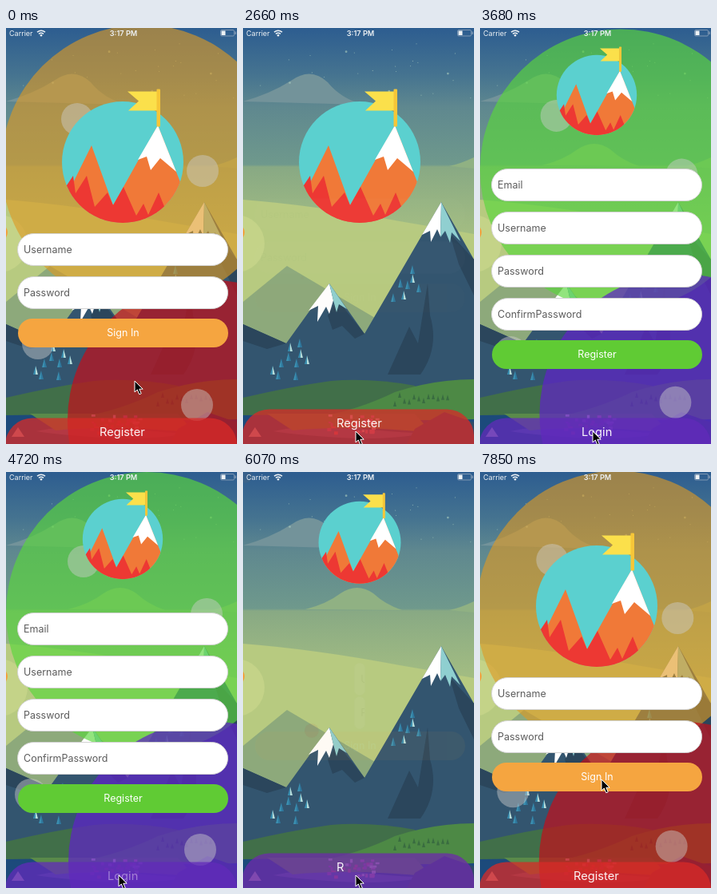
An HTML page for the animation above (8000 ms loop, 289 by 521 pixels).

```html
<!DOCTYPE html>
<html lang="en">
<head>
<meta charset="utf-8">
<title>Sign in and register</title>
<style>
  html, body { margin: 0; width: 100%; height: 100%; overflow: hidden; background: #2d5d90; }
  body { position: relative; font-family: Inter, Roboto, sans-serif; }
  svg { position: absolute; left: 0; top: 0; }
  .field, .button { position: absolute; box-sizing: border-box; white-space: nowrap; overflow: hidden; font-size: 12.5px; }
  .field {
    height: 41px; padding: 0 5px 0 7px; line-height: 39px; border: 1px solid #d2d2d2; border-radius: 21px;
    background: #fff; color: #5c5c5c; text-overflow: ellipsis;
  }
  .button { left: 15px; width: 263px; height: 36px; line-height: 36px; border-radius: 18px; color: #fff; text-align: center; }
</style>
</head>
<body>
<svg width="289" height="521" viewBox="0 0 289 521">
  <defs>
    <linearGradient id="sky" gradientUnits="userSpaceOnUse" x1="0" y1="0" x2="0" y2="300">
      <stop offset="0" stop-color="#2d5d90"/>
      <stop offset=".2" stop-color="#467490"/>
      <stop offset=".33" stop-color="#5f888f"/>
      <stop offset=".57" stop-color="#6f998c"/>
      <stop offset=".58" stop-color="#88a984"/>
      <stop offset=".7" stop-color="#94b283"/>
      <stop offset=".85" stop-color="#a2bc82"/>
    </linearGradient>
    <clipPath id="disc"><circle cx="146" cy="168" r="76"/></clipPath>
  </defs>

  <rect width="289" height="521" fill="url(#sky)"/>
  <path d="M0 92Q35 82 60 66Q85 48 106 68Q122 88 150 96Z" fill="#73939a"/>
  <path d="M78 172Q105 165 122 152Q143 138 163 152Q178 166 199 173ZM258 173Q272 170 289 162V176Z" fill="#90b183"/>
  <path d="M0 215Q90 222 196 242L289 258V400H0Z" fill="#b7ca80"/>
  <circle cx="-9" cy="270" r="36" fill="#c4d388"/>
  <circle cx="-9" cy="256" r="11" fill="#f3a03c"/>
  <path d="M0 343L55 298L165 363V410H0Z" fill="#8da97b"/>
  <path d="M0 371L54 395L108 320L152 383L248 218L289 290V500H0Z" fill="#33556f"/>
  <path d="M0 371L54 395L30 402L0 392ZM118 340L152 383L140 389L124 373L112 378L106 360ZM258 256L289 290V335L270 296ZM231 320L219 395L208 374L181 434H222Q246 400 234 360Z" fill="#2b465c"/>
  <path d="M108 320L82 354L94 348L93 368L104 349L108 358L113 341Z" fill="#fff"/>
  <path d="M108 320L113 341L117 356L120 346L130 352Z" fill="#8fcfd0"/>
  <path d="M248 218L224 259L234 254L235 268L243 252L247 261Z" fill="#fff"/>
  <path d="M248 218L247 262L253 254L259 269L261 256L272 267Z" fill="#8fcfd0"/>
  <g id="trees"></g>
  <path d="M0 463Q60 449 110 442Q160 438 215 448L240 490H0Z" fill="#416f49"/>
  <path d="M92 488Q145 478 190 456Q240 440 289 440V521H92Z" fill="#4d8945"/>
  <path d="M0 485Q70 483 145 488T289 490V521H0Z" fill="#1c4a7b"/>
  <path d="M38 505Q90 494 145 501T232 507Q180 517 120 513T38 505Z" fill="#476497"/>
  <path d="M30 483H215L236 507Q140 497 62 504Z" fill="#5a8a4a"/>
  <path d="M215 502L252 481L289 494V521H205Z" fill="#304b67"/>
  <path d="M7 512L15 500L23 512Z" fill="#b5a5bd"/>
  <g id="town" opacity=".8"></g>

  <circle class="big"/><circle class="big"/>
  <g id="bubbles"></g>

  <rect id="bar" x="-1" width="290" height="80" rx="34"/>
  <text id="barText" font-size="14.7" fill="#fff"></text>

  <g id="logo">
    <circle cx="146" cy="168" r="76" fill="#5bd0cf"/>
    <g clip-path="url(#disc)">
      <path d="M66 230L107 147L134 222L190 122L222 203V250H66Z" fill="#f07938"/>
      <path d="M190 122L165 165L176 161L181 178L193 163L213 180Z" fill="#fff"/>
      <path d="M66 212L84 185L87 207L101 185L111 224L127 206L134 222L147 199L163 235L172 220L178 234L191 206L199 226L222 208V250H66Z" fill="#ed3833"/>
    </g>
    <path d="M152 79.5H189V103.5H153L166 91.5Z" fill="#fbe04b"/>
    <rect x="188.5" y="76.5" width="4.5" height="47" rx="1" fill="#f6c638"/>
  </g>

  <g fill="#eef2f5">
    <text x="4" y="9.5" font-size="9">Carrier</text>
    <text x="147" y="9.5" font-size="9.2" font-weight="600" text-anchor="middle">3:17 PM</text>
    <path d="M39 5.2Q44 1.2 49 5.2M41 7.4Q44 5 47 7.4" fill="none" stroke="#eef2f5" stroke-width="1.5"/>
    <circle cx="44" cy="9.2" r="1.3"/>
    <rect x="268.5" y="2.5" width="17" height="7.5" rx="1.5" fill="none" stroke="#7f98b3"/>
    <rect x="269.5" y="3.5" width="5" height="5.5"/>
    <rect x="286.5" y="4.5" width="1.5" height="3.5" fill="#7f98b3"/>
  </g>
</svg>
<svg width="289" height="521" viewBox="0 0 289 521" style="z-index:1">
  <path id="cursor" d="M0 0V14L3.3 11L5.8 16.8L8.2 15.8L5.8 10.2H10.2Z" fill="#000" stroke="#fff"/>
</svg>

<script>
const $ = id => document.getElementById(id);
const LOOP = 8000, ENTER_MS = 750;
const TO_REGISTER = { press: 1700, exit: 1900, enter: 2936 };
const TO_LOGIN = { press: 4690, exit: 4933, enter: 5969 };

const clamp = x => Math.max(0, Math.min(1, x));
const ramp = (t, start, ms) => clamp((t - start) / ms);
const ease = (t, start, ms) => { const x = ramp(t, start, ms); return x * x * (3 - 2 * x); };
const mix = (a, b, k) => a + (b - a) * k;
const mixAll = (a, b, k) => a.map((v, i) => mix(v, b[i], k));

function addShape(parent, tag, attrs) {
  const node = document.createElementNS("http://www.w3.org/2000/svg", tag);
  setAttrs(node, attrs);
  return parent.appendChild(node);
}
function setAttrs(node, attrs) {
  for (const name in attrs) node.setAttribute(name, attrs[name]);
}

// Small scenery
let seed = 7;
const random = () => (seed = seed * 16807 % 2147483647) / 2147483647;
const trees = [[37,434],[44,440],[48,425],[59,405],[57,417],[71,400],[72,413],[67,425],[66,441],[80,421],
  [188,343],[197,325],[201,340],[206,327],[212,308],[212,319],[220,331]];
trees.forEach(([x, y], i) => {
  addShape($("trees"), "path", { d: `M${x} ${y}v-11l-3 11z`, fill: "#3b8fb0" });
  addShape($("trees"), "path", { d: `M${x} ${y}v-11l3 11z`, fill: i % 3 ? "#2f789d" : "#b5dcda" });
});
for (let i = 0; i < 12; i++)
  addShape($("town"), "path", { d: `M${188 + i * 6} ${474 - random() * 12}l2 -7l2 7z`, fill: "#35653f" });
for (let i = 0; i < 36; i++)
  addShape($("town"), "rect", {
    x: 102 + random() * 64, y: 484 + random() * 22, width: 3 + random() * 3, height: 2 + random() * 3,
    fill: ["#ee586e", "#d877a4", "#b65c9b", "#f0c6d0"][i % 4]
  });
for (let i = 0; i < 24; i++)
  addShape($("trees"), "circle", { cx: random() * 289, cy: 18 + random() * 70, r: i % 6 ? .6 : 1.4, fill: "#a5c7bc", opacity: .65 });

// Screens
function makeForm(labels, buttonLabel, color) {
  const make = (kind, text) => {
    const node = document.createElement("div");
    node.className = kind;
    node.textContent = text;
    return document.body.appendChild(node);
  };
  const form = { fields: labels.map(text => make("field", text)), button: make("button", buttonLabel) };
  form.button.style.background = color;
  return form;
}
const login = {
  ...makeForm(["Username", "Password"], "Sign In", "#f5a540"),
  top: [259, 277], buttonY: [341, 382], barLabel: "Register", barX: 117,
  circles: ["rgba(223,154,34,.62)", "rgba(195,15,27,.7)"]
};
const register = {
  ...makeForm(["Email", "Username", "Password", "ConfirmPassword"], "Register", "#60cb34"),
  top: [250, 196], buttonY: [409, 409], barLabel: "Login", barX: 127,
  circles: ["rgba(90,215,60,.66)", "rgba(95,35,198,.72)"]
};
const bigCircles = [...document.querySelectorAll(".big")];

// Corner of each bubble at the start and end of its drift
const bubbles = [
  { login: [[69, 94], [71, 88]], register: [[75, 89], [77, 92]] },
  { login: [[226, 159], [228, 165]], register: [[233, 166], [231, 158]] },
  { login: [[20, 375], [22, 383]], register: [[22, 387], [11, 384]] },
  { login: [[219, 452], [220, 447]], register: [[225, 447], [223, 453]] }
];
for (const bubble of bubbles)
  bubble.node = addShape($("bubbles"), "circle", { fill: "rgb(205,205,205)" });

const cursorPath = [[0, 161, 442], [300, 161, 442], [1600, 140, 507], [2400, 141, 505],
  [6350, 141, 505], [6510, 141, 491], [7650, 152, 385], [LOOP, 152, 385]];

function drawForm(form, visible, enter, alpha, slide) {
  const width = 264 * enter;
  const top = mix(...form.top, enter);
  const step = mix(41, 54, enter);
  form.fields.forEach((node, i) => Object.assign(node.style, {
    display: visible ? "block" : "none", opacity: alpha,
    left: 146 - width / 2 + "px", width: width + "px", top: top + i * step - 20.5 - slide + "px"
  }));
  Object.assign(form.button.style, {
    display: visible ? "block" : "none", opacity: alpha,
    top: mix(...form.buttonY, enter) - 18 - slide + "px"
  });
}

function placeCircle(node, x, y, r, opacity) {
  setAttrs(node, { cx: x + r, cy: y + r, r, opacity });
}

function draw(t) {
  const registering = t >= TO_REGISTER.enter && t < TO_LOGIN.enter;
  const screen = registering ? register : login;
  const began = registering ? TO_REGISTER.enter : t < TO_REGISTER.enter ? -2000 : TO_LOGIN.enter;
  const leaving = registering ? TO_LOGIN : t < TO_REGISTER.enter ? TO_REGISTER : { press: LOOP, exit: LOOP };
  const enter = ease(t, began, ENTER_MS);
  const stay = 1 - ease(t, leaving.exit + 200, 600);
  const presence = enter * stay;

  const slide = 44 * ease(t, leaving.exit, 700);
  drawForm(login, !registering, enter, presence, slide);
  drawForm(register, registering, enter, presence, slide);

  const drift = registering ? ramp(t, 3240, 1480) : t < TO_REGISTER.enter ? ramp(t, 0, 2060) : .65 * ramp(t, 6510, 1340);
  const corners = registering
    ? [[0, 2 - 2 * drift], [mix(73, 78, drift), mix(306, 312, drift)]]
    : [[-6 + 2 * drift, -4 + 4 * drift], [77 - 5 * drift, 315 - 4 * drift]];
  bigCircles.forEach((node, i) => {
    node.setAttribute("fill", screen.circles[i]);
    placeCircle(node, ...corners[i], 176 * presence, presence ** .8);
  });
  for (const bubble of bubbles) {
    const path = registering ? bubble.register : bubble.login;
    placeCircle(bubble.node, ...mixAll(...path, drift), 20 * presence, .45 * presence);
  }

  const logoShift = registering ? 1 - enter : enter;
  const scale = mix(.66, 1, logoShift);
  $("logo").setAttribute("transform", `translate(146 ${mix(84, 168, logoShift)}) scale(${scale}) translate(-146 -168)`);

  const lift = 11 * (ease(t, TO_REGISTER.exit, 150) - ease(t, TO_REGISTER.enter + 110, 170)
    + ease(t, TO_LOGIN.exit, 150) - ease(t, TO_LOGIN.enter + 110, 170));
  const purple = ramp(t, TO_REGISTER.enter + 80, 200) - ramp(t, TO_LOGIN.enter + 80, 220);
  const barColor = mixAll([217, 42, 39], [98, 42, 186], purple).map(Math.round);
  setAttrs($("bar"), { y: 488.5 - lift, fill: `rgba(${barColor},.75)` });

  const pressed = t >= leaving.press && t < leaving.exit;
  const letters = Math.floor((t - began) / 88);
  setAttrs($("barText"), { x: screen.barX, y: 511 - lift, "fill-opacity": pressed ? .4 : .95 });
  $("barText").textContent = screen.barLabel.slice(0, letters);

  const next = cursorPath.findIndex(point => point[0] > t);
  const [from, to] = [cursorPath[next - 1], cursorPath[next]];
  const [, x, y] = mixAll(from, to, (t - from[0]) / (to[0] - from[0]));
  $("cursor").setAttribute("transform", `translate(${x} ${y})`);
}

const start = performance.now();
function frame() {
  draw((performance.now() - start) % LOOP);
  requestAnimationFrame(frame);
}
frame();
</script>
</body>
</html>
```
